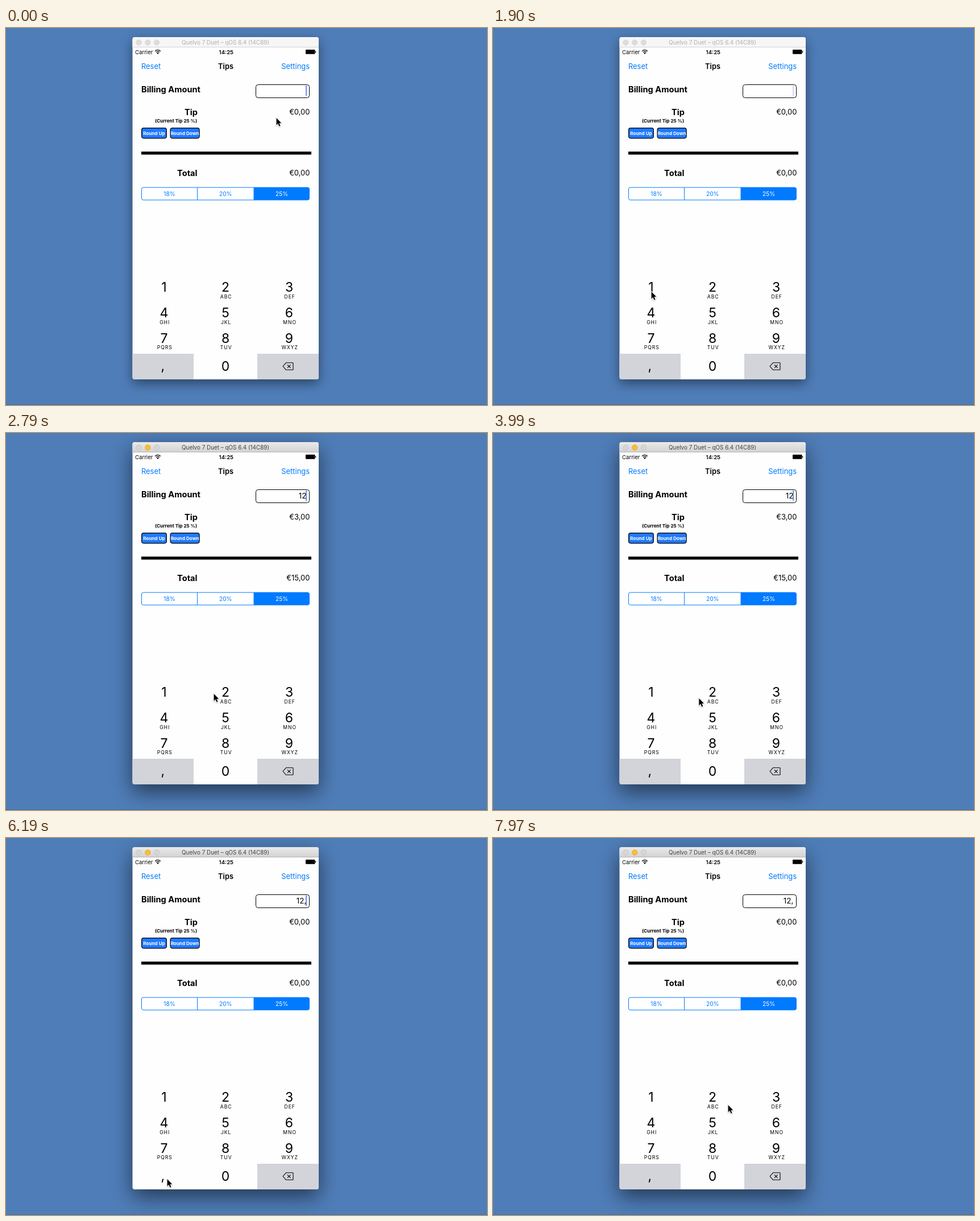
Write an HTML page with a canvas that moves like this. It is 846 by 662 pixels and loops after 8 s.

```html
<!DOCTYPE html>
<html lang="en">
<head>
<meta charset="utf-8">
<title>Tip calculator</title>
<style>
  html, body { margin: 0; width: 846px; height: 662px; overflow: hidden; background: #4f7db8; }
  canvas { display: block; }
</style>
</head>
<body>
<canvas id="stage" width="846" height="662"></canvas>
<script>
const ctx = document.getElementById('stage').getContext('2d');
const LOOP = 8000;
const STEP = 148.05;
const FIRST_STEP = 114;
const BLUE = '#007aff';
const KEY_GRAY = '#d2d4da';
const WIN = { x: 222.5, y: 16, w: 327.5, h: 601 };

const ENTRIES = [
  { step: -4, bill: '' },
  { step: 14, bill: '1' },
  { step: 18, bill: '12' },
  { step: 41, bill: '12,' }
];

// step, x, y of the pointer tip
const POINTER = [
  [-1, 475, 158], [7, 475, 158], [12, 278, 463], [13, 278, 463],
  [14, 365, 458], [25, 365, 458], [32, 306, 603], [34, 283, 599],
  [41, 283, 599], [45, 402, 447], [46, 413, 450], [47, 413, 450], [53, 413, 469]
];

const ROWS = [
  { y: 438, h: 45, base: 463, keys: ['1', '2', '3'], letters: ['', 'ABC', 'DEF'] },
  { y: 483, h: 44, base: 508, keys: ['4', '5', '6'], letters: ['GHI', 'JKL', 'MNO'] },
  { y: 527, h: 45, base: 552.5, keys: ['7', '8', '9'], letters: ['PQRS', 'TUV', 'WXYZ'] },
  { y: 572, h: 45, base: 602, keys: [',', '0', ''], letters: ['', '', ''] }
];
const COLUMNS = [
  { x: 222, w: 108, mid: 278 },
  { x: 330, w: 112, mid: 386 },
  { x: 442, w: 108, mid: 498 }
];

function text(str, x, y, size, { weight = 400, align = 'left', color = '#000', spacing = 0 } = {}) {
  ctx.font = `${weight} ${size}px Inter, sans-serif`;
  ctx.letterSpacing = `${spacing}px`;
  ctx.textAlign = align;
  ctx.fillStyle = color;
  ctx.fillText(str, x, y);
}

function rect(x, y, w, h, color) {
  ctx.fillStyle = color;
  ctx.fillRect(x, y, w, h);
}

function box(x, y, w, h, r, fill, stroke, line = 1) {
  ctx.beginPath();
  ctx.roundRect(x, y, w, h, r);
  if (fill) { ctx.fillStyle = fill; ctx.fill(); }
  if (stroke) { ctx.strokeStyle = stroke; ctx.lineWidth = line; ctx.stroke(); }
}

function polygon(points) {
  ctx.beginPath();
  points.forEach(([x, y]) => ctx.lineTo(x, y));
  ctx.closePath();
}

function pointerAt(step) {
  const next = POINTER.findIndex(p => p[0] >= step);
  if (next < 1) return POINTER[0].slice(1);
  const [s0, x0, y0] = POINTER[next - 1];
  const [s1, x1, y1] = POINTER[next];
  const k = (step - s0) / (s1 - s0);
  const e = k * k * (3 - 2 * k);
  return [x0 + (x1 - x0) * e, y0 + (y1 - y0) * e];
}

function caretAlpha(step, typedAt) {
  if (step < 3) return step < 0 ? 1 : 0;
  const since = step - typedAt - 4;
  if (since < 0) return 1;
  const phase = since % (typedAt < 0 ? 6 : 6.5);
  if (phase < 0.4) return 0.35;
  if (phase < 3) return 0;
  return phase < 3.5 ? 0.5 : 1;
}

function pressedKey(step) {
  if (step === 13) return '1';
  if (step === 17) return '2';
  return step === 40 || step === 41 ? ',' : null;
}

const euros = value => '€' + value.toFixed(2).replace('.', ',');

function drawWindow(active) {
  ctx.save();
  ctx.shadowColor = active ? 'rgba(0,0,0,.55)' : 'rgba(0,0,0,.45)';
  ctx.shadowBlur = active ? 36 : 20;
  ctx.shadowOffsetY = active ? 13 : 7;
  box(WIN.x, WIN.y, WIN.w, WIN.h, 4, '#fefefe');
  ctx.restore();

  let bar = '#f6f6f6';
  if (active) {
    bar = ctx.createLinearGradient(0, 16, 0, 34);
    bar.addColorStop(0, '#eaeaea');
    bar.addColorStop(1, '#d2d2d2');
  }
  box(WIN.x, WIN.y, WIN.w, 18, [4, 4, 0, 0], bar);
  rect(WIN.x, 33, WIN.w, 1, active ? '#b4b4b4' : '#d4d4d4');

  [233.5, 249.3, 265].forEach((x, i) => {
    const lit = active && i === 1;
    ctx.beginPath();
    ctx.arc(x, 25.5, 4.7, 0, Math.PI * 2);
    ctx.fillStyle = lit ? '#fdbd2f' : active ? '#d6d6d6' : '#dcdcdc';
    ctx.fill();
    ctx.strokeStyle = lit ? '#dfa023' : active ? '#bebebe' : '#d0d0d0';
    ctx.lineWidth = 0.7;
    ctx.stroke();
  });
  text('Quelvo 7 Duet – qOS 6.4 (14C89)', 386, 29.2, 9.9,
    { align: 'center', color: active ? '#434343' : '#b1b1b1' });
}

function drawStatusBar() {
  text('Carrier', 227, 45.8, 9.6);
  text('14:25', 387.3, 45.8, 9.6, { weight: 600, align: 'center' });
  ctx.strokeStyle = '#000';
  ctx.lineWidth = 1.3;
  for (const r of [3.8, 6.6]) {
    ctx.beginPath();
    ctx.arc(267, 45.3, r, -Math.PI * 0.76, -Math.PI * 0.24);
    ctx.stroke();
  }
  ctx.beginPath();
  ctx.moveTo(267, 46);
  ctx.arc(267, 46, 2.5, -Math.PI * 0.76, -Math.PI * 0.24);
  ctx.fillStyle = '#000';
  ctx.fill();
  box(527, 38, 16.5, 7.8, 1, '#000');
  rect(544, 40.5, 1.2, 2.8, '#000');
}

function drawForm(bill, caret) {
  const amount = Number(bill) || 0;
  const tip = amount * 0.25;
  const bold = { weight: 700 };
  const boldRight = { weight: 700, align: 'right' };
  const right = { align: 'right' };

  text('Reset', 238, 72.2, 12.9, { color: BLUE });
  text('Tips', 386.5, 72.2, 12.9, { weight: 600, align: 'center' });
  text('Settings', 534, 72.2, 12.9, { color: BLUE, align: 'right' });

  text('Billing Amount', 238, 113.2, 14.6, bold);
  box(439.5, 99.5, 94, 23, 4, '#fff', '#000');
  text(bill, 528.3, 115.4, 13.4, right);
  ctx.globalAlpha = caret;
  rect(527.3, 101, 1.5, 18, '#4468dc');
  ctx.globalAlpha = 1;

  text('Tip', 337, 152.8, 14.6, boldRight);
  text(euros(tip), 534.5, 151.7, 13, right);
  text('(Current Tip 25 %)', 336, 166, 8.2, boldRight);

  const label = { weight: 700, align: 'center', color: '#fff' };
  box(238.6, 175.6, 43.8, 18, 3.5, '#2079ff', '#000', 1.2);
  text('Round Up', 260.5, 187.6, 8.1, label);
  box(289.1, 175.6, 51, 18, 3.5, '#2079ff', '#000', 1.2);
  text('Round Down', 314.6, 187.6, 8.1, label);

  rect(238, 217, 299, 5.3, '#000');
  text('Total', 336.5, 259.7, 14.6, boldRight);
  text(euros(amount + tip), 534.5, 258.7, 13, right);
}

function drawSegments() {
  box(238.5, 280, 295, 22, 3, '#fff', BLUE);
  box(435.5, 280, 98, 22, [0, 3, 3, 0], BLUE);
  rect(336, 280, 1, 22, BLUE);
  ['18%', '20%', '25%'].forEach((str, i) => {
    text(str, 287.5 + i * 98.8, 294.8, 10.2, { align: 'center', color: i === 2 ? '#fff' : BLUE });
  });
}

function drawBackspace() {
  ctx.strokeStyle = '#000';
  ctx.lineWidth = 1.1;
  ctx.lineJoin = 'round';
  polygon([[487, 594], [492.5, 587.8], [504.5, 587.8], [505, 588.3], [505, 599.8], [504.5, 600.3], [492.5, 600.3]]);
  ctx.stroke();
  ctx.beginPath();
  ctx.moveTo(495, 591.3);
  ctx.lineTo(500.6, 596.9);
  ctx.moveTo(500.6, 591.3);
  ctx.lineTo(495, 596.9);
  ctx.stroke();
}

function drawKeypad(pressed) {
  ctx.save();
  ctx.beginPath();
  ctx.roundRect(WIN.x, WIN.y, WIN.w, WIN.h, 4);
  ctx.clip();
  for (const row of ROWS) {
    row.keys.forEach((key, i) => {
      const col = COLUMNS[i];
      const grayAtRest = key === ',' || key === '';
      if (grayAtRest !== (key === pressed)) rect(col.x, row.y, col.w, row.h, KEY_GRAY);
      const comma = key === ',';
      text(key, comma ? 275.7 : col.mid, comma ? 600.5 : row.base, 23, { align: 'center' });
      text(row.letters[i], col.mid + 1.2, row.base + 11.8, 8.6, { align: 'center', spacing: 1 });
    });
  }
  drawBackspace();
  ctx.restore();
}

function drawPointer([x, y]) {
  ctx.save();
  ctx.translate(x + 0.6, y);
  ctx.shadowColor = 'rgba(0,0,0,.3)';
  ctx.shadowBlur = 2;
  ctx.shadowOffsetY = 1;
  polygon([[0, 0], [0, 12.4], [2.8, 9.8], [4.9, 14.6], [6.9, 13.7], [4.9, 9], [8.6, 8.8]]);
  ctx.strokeStyle = '#fff';
  ctx.lineWidth = 1.6;
  ctx.lineJoin = 'miter';
  ctx.stroke();
  ctx.shadowColor = 'transparent';
  ctx.fillStyle = '#000';
  ctx.fill();
  ctx.restore();
}

function draw(time) {
  const step = Math.floor((time - FIRST_STEP) / STEP);
  const entry = ENTRIES.filter(e => e.step <= step).pop();
  rect(0, 0, 846, 662, '#4f7db8');
  rect(0, 661, 846, 1, '#456e a3'.replace(' ', ''));
  drawWindow(step >= 13);
  drawStatusBar();
  drawForm(entry.bill, caretAlpha(step, entry.step));
  drawSegments();
  drawKeypad(pressedKey(step));
  drawPointer(pointerAt(step));
}

function tick() {
  draw(performance.now() % LOOP);
  requestAnimationFrame(tick);
}
tick();
</script>
</body>
</html>
```
